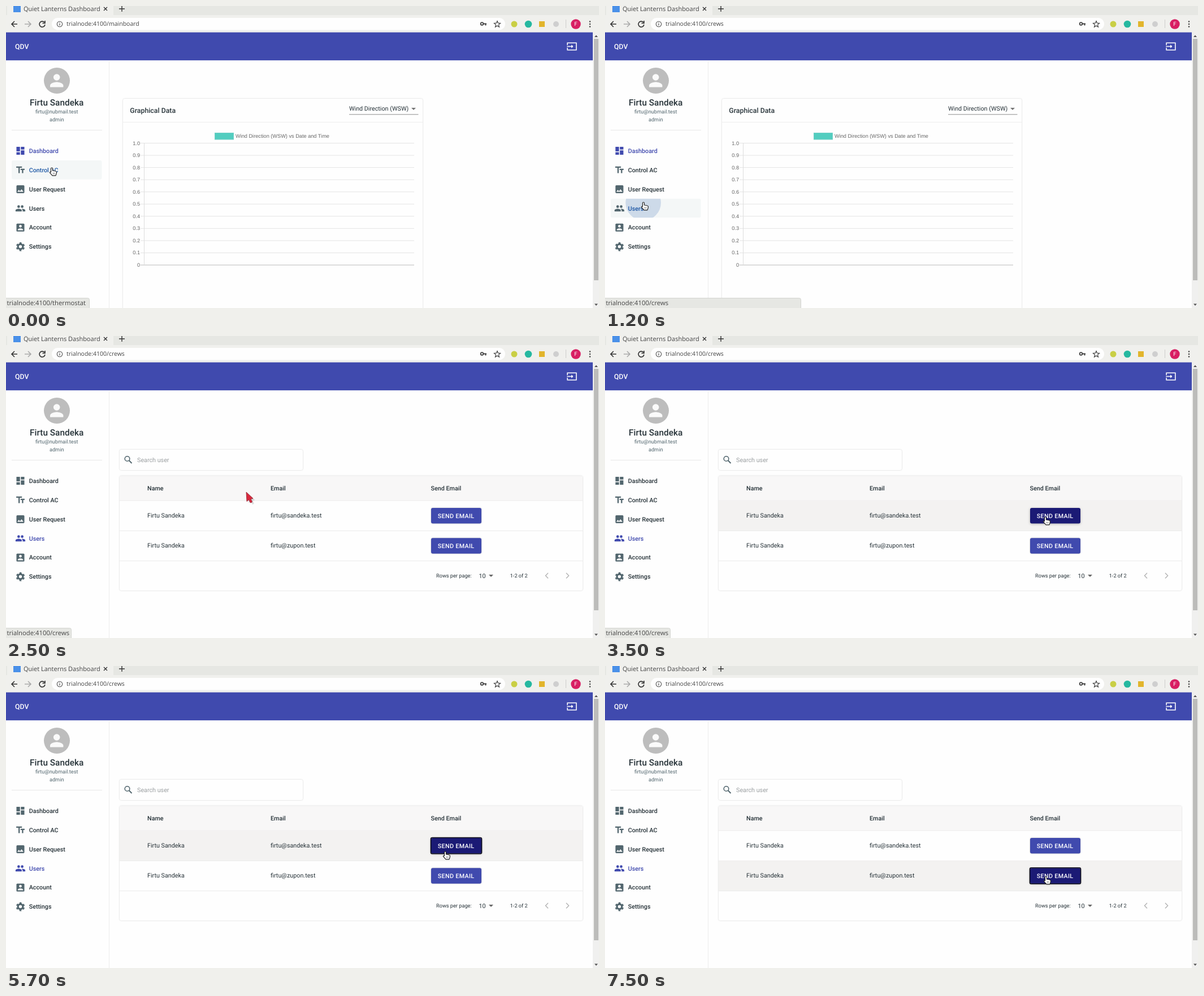
Recreate the animation shown at these times as an HTML page. Size 1049x534 px, loop 8000 ms.

```html
<!DOCTYPE html>
<html lang="en">
<head>
<meta charset="utf-8">
<title>Dashboard demo</title>
<style>
  html, body { margin: 0; width: 100%; height: 100%; overflow: hidden; background: #fefefe; }
  svg { display: block; width: 100%; height: 100%; }
  text { font-family: Roboto, sans-serif; text-rendering: geometricPrecision; white-space: pre; }
  .chrome { font-family: "Open Sans", sans-serif; }
  .chart { font-family: "Liberation Sans", Arial, sans-serif; }
  .card { fill: #fefefe; filter: drop-shadow(0 .6px 1px #0003); }
  .line { fill: none; stroke: currentColor; }
</style>
</head>
<body>
<svg id="stage" viewBox="0 0 1049 534"></svg>
<script>
const INDIGO = '#404aae', LINK = '#1c57a5', INK = '#263238', SLATE = '#52666e', TOOLBAR = '#f0f0ed';
const HOST = 'trialnode:4100/';
const NAME = 'Firtu Sandeka';

// Markup helpers
const rect = (x, y, w, h, fill, more = '') =>
  `<rect x="${x}" y="${y}" width="${w}" height="${h}" fill="${fill}" ${more}/>`;
const disc = (x, y, r, fill, more = '') =>
  `<circle cx="${x}" cy="${y}" r="${r}" fill="${fill}" ${more}/>`;
const text = (x, y, str, size, fill = INK, more = '') =>
  `<text x="${x}" y="${y}" font-size="${size}" fill="${fill}" ${more}>${str}</text>`;
const line = (d, color, width = 1, more = '') =>
  `<path class="line" d="${d}" color="${color}" stroke-width="${width}" ${more}/>`;
const icon = (x, y, body, scale = .78, more = '') =>
  `<g transform="translate(${x} ${y}) scale(${scale}) translate(-12 -12)" ${more}>${body}</g>`;
const path = (d, more = '') => `<path d="${d}" ${more}/>`;
const BOLD = 'font-weight="500" ', MID = 'text-anchor="middle"';

const PERSON = '<circle cx="8" cy="8" r="3"/><path d="M8 13c-2.3 0-7 1.2-7 3.5V19h14v-2.5c0-2.3-4.7-3.5-7-3.5z"/>';
const menu = [
  ['Dashboard', path('M3 3h8v10H3zM3 15h8v6H3zM13 11h8v10h-8zM13 3h8v6h-8z')],
  ['Control AC', path('M2.5 4v3h5v12h3V7h5V4zM21.5 9h-9v3h3v7h3v-7h3z')],
  ['User Request', path('M5 3h14q2 0 2 2v14q0 2-2 2H5q-2 0-2-2V5q0-2 2-2zM8.5 13.5L5 18h14l-4.5-6-3.5 4.5z', 'fill-rule="evenodd"')],
  ['Users', PERSON + '<circle cx="16" cy="8" r="3"/><path d="M16 13l-1 .1q2 1.4 2 3.4V19h6v-2.5c0-2.3-4.7-3.5-7-3.5z"/>'],
  ['Account', '<rect x="3" y="3" width="18" height="18" rx="2"/><g fill="#fefefe"><circle cx="12" cy="9" r="3"/><path d="M6 18v-1c0-2 4-3.1 6-3.1s6 1.1 6 3.1v1z"/></g>'],
  ['Settings', '<g fill="none" stroke="currentColor"><circle cx="12" cy="12" r="5.6" stroke-width="4.2"/><circle cx="12" cy="12" r="8.6" stroke-width="2.8" stroke-dasharray="4.6 4.406" stroke-dashoffset="6.8"/></g>'],
];
const MENU_TOP = 239.1, ROW = 33.9;
const menuRow = i => [10, MENU_TOP + ROW * i, 159.5, 33.5];

function browser() {
  return rect(0, 0, 1049, 17, '#e6e7e3') + rect(2, -8, 188, 30, TOOLBAR, 'rx="6"') +
    rect(0, 16, 1049, 31, TOOLBAR) + rect(13, 0, 13, 11, '#4a90e8') +
    text(31, 8.8, 'Quiet Lanterns Dashboard', 11, '#444', 'class="chrome"') +
    line('M173 2l6 6m0-6l-6 6M205 0v10m-5-5h10', '#333', 1.4) +
    line('M20 32H10m5-5l-5 5 5 5', '#333', 1.6) +
    line('M33 32h11m-5-5l5 5-5 5', '#aaa', 1.6) +
    line('M68 29a5 5 0 1 0 1 4M69 26v4.5h-4.5', '#333', 1.6) +
    rect(81, 21, 802, 21.5, '#fefefe', 'rx="10.7"') +
    disc(95, 32, 4.7, 'none', 'stroke="#555" stroke-width="1.1"') + line('M95 31v3.5M95 29v1', '#555', 1.2) +
    text(107, 35.3, '', 10.5, '#444', 'class="chrome" id="url"') +
    disc(842, 31.5, 2.3, 'none', 'stroke="#444" stroke-width="1.8"') + line('M844 31.5h6m-1.5 0v3', '#444', 1.8) +
    line('M869 26.5l1.5 3.7 4 .3-3 2.6 1 4-3.5-2.2-3.5 2.2 1-4-3-2.6 4-.3z', '#444', 1.2) +
    disc(899, 32, 5.5, '#c9cf45') + disc(924, 32, 6.3, '#26b8a0') +
    rect(943, 27, 10, 10, '#e2b52c') + disc(973, 32, 5, '#cfcfcf') +
    line('M990.5 24v15', '#ccc') + disc(1008, 32, 8.7, '#d81f63') +
    text(1008, 35.4, 'F', 9.5, '#fff', MID) +
    [27.5, 32, 36.5].map(y => disc(1033, y, 1.3, '#444')).join('') +
    rect(1038, 47, 11, 487, '#f0f0ef') + rect(1040, 58, 8, 427, '#bcbcba') +
    path('M1041 55l3-3.5 3 3.5zM1041 526.5l3 3.5 3-3.5z', 'fill="#555"');
}

function sidebar() {
  const items = menu.map(([label, body], i) => {
    const [x, y, w, h] = menuRow(i);
    return rect(x, y, w, h, '#f4f7f7', 'rx="3" class="hover"') +
      icon(25.5, y + 17, body, .78, 'class="icon"') +
      text(40.7, y + 20.7, label, 10.75, INK, BOLD + 'class="label"');
  }).join('');
  return line('M182.5 96V534', '#ececec') + disc(90, 132, 23, '#bdbdbd') +
    disc(89.7, 126, 5.8, '#fafafa') + path('M78 143.5v-3c0-4 8-6 11.7-6s11.7 2 11.7 6v3z', 'fill="#fafafa"') +
    text(89.7, 175.8, NAME, 15.4, INK, BOLD + MID) +
    text(89.7, 189.5, 'firtu@nubmail.test', 9.2, SLATE, MID) +
    text(89.7, 203.5, 'admin', 9.2, SLATE, MID) +
    line('M10 219.5H170', '#e8e8e8') + items +
    `<clipPath id="menuClip">${rect(...menuRow(3), '#000', 'rx="3"')}</clipPath>` +
    `<g clip-path="url(#menuClip)">${disc(67.7, 348, 0, LINK, 'id="menuRipple"')}</g>`;
}

function chartPage() {
  let grid = '';
  for (let i = 0; i <= 10; i++) {
    const y = 242.5 + i * 21.55;
    grid += line(`M238 ${y}H722`, i < 10 ? '#e4e4e4' : '#b9b9b9') +
      text(237, y + 3, i < 10 ? (1 - i / 10).toFixed(1) : '0', 9.2, '#666', 'class="chart" text-anchor="end"');
  }
  return rect(207, 164, 530, 400, '', 'rx="3" class="card"') + line('M207 205.5H737', '#eee') +
    text(219.3, 188.8, 'Graphical Data', 12.3, INK, BOLD) +
    text(607, 185.3, 'Wind Direction (WSW)', 10.75) + line('M607 191.8H729.5', '#8e8e8e') +
    path('M717 180h8l-4 4z', 'fill="#757575"') +
    rect(369.5, 224.5, 33, 11.5, '#52cdbf', 'stroke="#72cfc6"') +
    text(406, 233, 'Wind Direction (WSW) vs Date and Time', 9.2, '#666', 'class="chart"') +
    grid + line('M244.5 242V458', '#dedede');
}

const rowTop = i => 291.5 + i * 53.2;

function tablePage() {
  const rows = ['sandeka', 'zupon'].map((domain, i) => {
    const y = rowTop(i);
    return rect(201, y, 819, 53, '#f3f2f1', 'class="row"') + line(`M201 ${y + 53}H1020`, '#ebebeb') +
      text(250, y + 29.3, NAME, 10.75) + text(468, y + 29.3, `firtu@${domain}.test`, 10.75) +
      `<clipPath id="clip${i}">${rect(752, y + 12.5, 89, 27.5, '#000', 'rx="3"')}</clipPath>` +
      rect(752, y + 12.5, 89, 27.5, INDIGO, 'rx="3" class="button"') +
      `<g clip-path="url(#clip${i})">${disc(780, y + 28, 0, '#fff', 'class="ripple"')}</g>` +
      rect(751.5, y + 12, 90, 28.5, 'none', 'rx="2.5" stroke="#0c0c18" stroke-width="1.6" class="focus"') +
      text(763.8, y + 30, 'SEND EMAIL', 10.75, '#fff', BOLD + 'letter-spacing=".31"');
  }).join('');
  const heads = [[250, 'Name'], [468, 'Email'], [751.5, 'Send Email']];
  return rect(201, 201, 324, 36, '', 'rx="3" class="card"') +
    disc(214.5, 217, 4.3, 'none', `stroke="${SLATE}" stroke-width="1.6"`) + line('M217.5 220l5 5', SLATE, 1.9) +
    text(232, 222.6, 'Search user', 10.75, '#9b9fa1') +
    rect(201, 247.5, 819, 202.5, '', 'rx="3" class="card"') +
    rect(201, 248, 819, 43, '#f8f7f7') + line('M201 291H1020', '#ebebeb') +
    heads.map(([x, label]) => text(x, 272.7, label, 10.75, INK, BOLD)).join('') +
    rows +
    text(761, 427, 'Rows per page:', 9.2) + text(836.5, 427.7, '10', 10.75) +
    path('M854 422h8l-4 4z', 'fill="#666"') + text(891.7, 427, '1-2 of 2', 9.2) +
    line('M959 419l-4.5 4.7 4.5 4.7M991 419l4.5 4.7-4.5 4.7', '#b5b5b5', 1.5);
}

const HAND = 'M0 0q1.500 0 1.500 1.500V5l5.200 1q1.900.4 1.800 2.200l-.6 3-1 2.600H1L-3.600 8.600Q-3.200 6.800-1.500 7.800V1.500Q-1.500 0 0 0z';
const ARROW = 'M0 0L1 16.5 4.5 13.5 7.5 19 10.5 17.5 8 12 12 11.3z';

const stage = document.getElementById('stage');
stage.innerHTML = rect(0, 0, 1049, 534, '#fefefe') + browser() +
  rect(0, 46.6, 1038, 49.5, INDIGO) + text(16, 75.5, 'QDV', 12.3, '#fff', BOLD) +
  icon(1001, 71.5, path('M2 9V4h20v16H2v-5', 'fill="none" stroke="#fff" stroke-width="2"') +
    path('M11 16l4-4-4-4v3H1v2h10z', 'fill="#fff"'), .79) +
  sidebar() + `<g id="chart">${chartPage()}</g><g id="table">${tablePage()}</g>` +
  `<g id="status">${rect(-4, 516.5, 0, 22, '#e6e7e3', 'rx="3" stroke="#d3d4d0" id="bubble"')}` +
  text(1.5, 529.3, '', 11.3, '#444', 'class="chrome" id="link"') + '</g>' +
  '<g id="hand">' + path(HAND, 'fill="#fff" stroke="#222" stroke-width="1.2" stroke-linejoin="round"') +
  line('M2.5 8.500v3m2.300-3v3', '#555', .8) + '</g>' +
  '<g id="arrow">' + path(ARROW, 'fill="#0002" transform="translate(3.5 3)"') +
  path(ARROW, 'fill="#d9283d" stroke="#8c2430" stroke-width=".8"') + '</g>';

const $ = id => document.getElementById(id);
const parts = {};
for (const cls of ['hover', 'icon', 'label', 'row', 'button', 'ripple', 'focus'])
  parts[cls] = [...stage.getElementsByClassName(cls)];
const show = (el, on) => el.style.display = on ? '' : 'none';

const ramp = (t, a, b) => Math.min(1, Math.max(0, (t - a) / (b - a)));
const smooth = x => x * x * (3 - 2 * x);
const mix = (a, b, k) => `rgb(${a.map((v, i) => v + (b[i] - v) * k)})`;

// Pointer hot spot: time, x, y
const track = [
  [200, 81, 286], [1100, 68, 347], [2000, 68, 347], [2400, 370, 269], [2500, 425, 276], [2900, 768, 311],
  [3500, 779, 320], [5600, 779, 320], [5700, 777, 328], [6100, 780, 370], [6300, 780, 372],
];
function pointer(t) {
  const next = track.findIndex(key => key[0] > t);
  if (next === 0) return track[0].slice(1);
  if (next < 0) return track.at(-1).slice(1);
  const [t0, x0, y0] = track[next - 1], [t1, x1, y1] = track[next];
  const k = smooth(ramp(t, t0, t1));
  return [x0 + (x1 - x0) * k, y0 + (y1 - y0) * k];
}

function ripple(el, t, start, radius, alpha, fade) {
  el.setAttribute('r', radius * smooth(ramp(t, start, start + 550)));
  el.setAttribute('opacity', alpha * (1 - ramp(t, start + 300, start + 300 + fade)));
}

const clicks = [3900, 6800];
const bubbleWidth = { thermostat: 148, requests: 138, crews: 116 };

function draw(t) {
  const [x, y] = pointer(t);
  const onTable = t >= 1400;
  const active = onTable ? 3 : 0;
  const over = x < 170 ? Math.floor((y - MENU_TOP) / ROW) : -1;

  menu.forEach((_, i) => {
    show(parts.hover[i], i === over);
    parts.label[i].setAttribute('fill', i === over ? LINK : i === active ? INDIGO : INK);
    const tint = i === active ? INDIGO : SLATE;
    parts.icon[i].setAttribute('fill', tint);
    parts.icon[i].setAttribute('color', tint);
  });
  ripple($('menuRipple'), t, 1000, 104, .18, 700);

  show($('chart'), !onTable);
  show($('table'), onTable);
  $('url').textContent = HOST + (t < 1200 ? 'mainboard' : 'crews');

  const route = over === 1 ? 'thermostat' : over === 2 ? 'requests' : 'crews';
  $('link').textContent = HOST + route;
  $('bubble').setAttribute('width', 3.5 + (t >= 1200 && t < 2200 ? 347 : bubbleWidth[route]));
  show($('status'), t < 4200);

  const heat = [ramp(t, 2700, 3100) - ramp(t, 5800, 6100), ramp(t, 5900, 6300)];
  const focused = clicks.findLastIndex(start => t >= start);
  heat.forEach((k, i) => {
    const top = rowTop(i);
    show(parts.row[i], x > 201 && y >= top && y < top + 53);
    parts.button[i].setAttribute('fill', mix([64, 74, 174], [27, 26, 117], k));
    parts.button[i].style.filter = `drop-shadow(0 ${.7 + k}px ${.9 + k}px #0004)`;
    show(parts.focus[i], i === focused);
    ripple(parts.ripple[i], t, clicks[i], 64, .3, 400);
  });

  const isHand = over >= 0 || (x >= 752 && x <= 841 && y >= 304);
  for (const [id, on] of [['hand', isHand], ['arrow', !isHand]]) {
    $(id).setAttribute('transform', `translate(${x} ${y})`);
    show($(id), on);
  }
}

function tick() {
  draw(Math.floor(performance.now() % 8000 / 100) * 100);
  requestAnimationFrame(tick);
}
tick();
</script>
</body>
</html>
```
